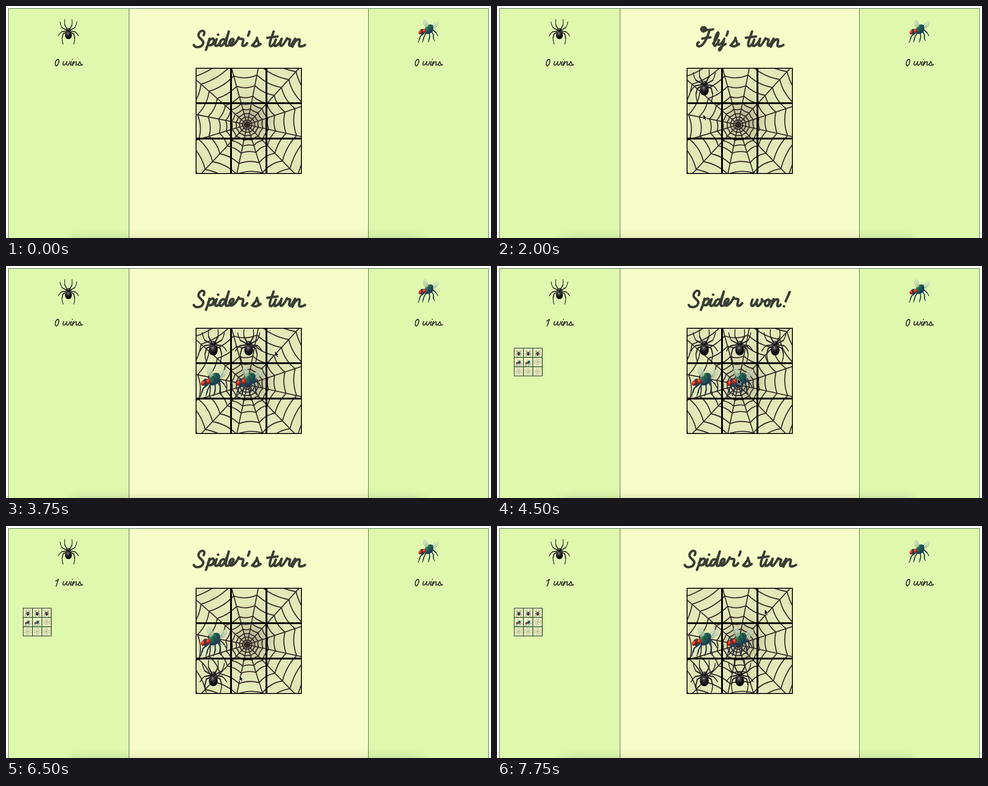
These frames come from a looping animation (1082x518 px, 8 s). An HTML page:

```html
<!DOCTYPE html>
<html lang="en">
<head>
<meta charset="utf-8">
<title>Spider and fly</title>
<style>
html, body { margin: 0; width: 100%; height: 100%; overflow: hidden; background: #fff; }
#stage { display: block; position: absolute; left: 0; top: 0; width: 1082px; height: 518px; overflow: hidden; }
.frame { stroke: #2a5a30; stroke-width: 1; }
.ink { fill: none; stroke: #3a3f35; stroke-linecap: round; stroke-linejoin: round; filter: drop-shadow(.8px .9px 0 #23281f); }
.big { stroke-width: 5; }
.small { stroke-width: 1.9; }
.label { fill: transparent; text-anchor: middle; font-family: "Noto Serif", serif; font-style: italic; }
.web { fill: none; stroke: #362c2a; stroke-linecap: round; }
.cell { fill: none; stroke: #000; stroke-width: 2; }
.mini-cell { fill: #f3f7c6; stroke: #2a5a30; stroke-width: .9; }
</style>
</head>
<body>
<svg id="stage" width="1082" height="518" viewBox="0 0 1082 518">
  <defs>
    <radialGradient id="shade" gradientUnits="userSpaceOnUse" cx="550" cy="256" r="150">
      <stop offset="0" stop-color="#adab8a"/>
      <stop offset=".14" stop-color="#bfbf98"/>
      <stop offset=".32" stop-color="#dbe0b0"/>
      <stop offset=".7" stop-color="#e5ebba"/>
      <stop offset="1" stop-color="#dfe5b3"/>
    </radialGradient>
    <filter id="blur" x="-10%" y="-200%" width="120%" height="500%">
      <feGaussianBlur stdDeviation="15"/>
    </filter>
    <radialGradient id="shell" cx=".42" cy=".27" r=".7">
      <stop offset="0" stop-color="#9a99a0"/>
      <stop offset=".22" stop-color="#434247"/>
      <stop offset=".55" stop-color="#18171b"/>
      <stop offset="1" stop-color="#060608"/>
    </radialGradient>
    <linearGradient id="green" x1="0" y1="0" x2=".5" y2="1">
      <stop offset="0" stop-color="#6fa873"/>
      <stop offset=".4" stop-color="#2a6e52"/>
      <stop offset="1" stop-color="#1b4356"/>
    </linearGradient>
    <radialGradient id="eye" cx=".4" cy=".35" r=".65">
      <stop offset="0" stop-color="#ff7a52"/>
      <stop offset=".45" stop-color="#dd2b1b"/>
      <stop offset="1" stop-color="#7c1210"/>
    </radialGradient>
    <linearGradient id="wing" x1="0" y1="0" x2="0" y2="1">
      <stop offset="0" stop-color="#e4f0d4" stop-opacity=".75"/>
      <stop offset="1" stop-color="#a3bf9c" stop-opacity=".75"/>
    </linearGradient>

    <g id="legs" fill="none" stroke="#19181c" stroke-linecap="round" stroke-linejoin="round">
      <path stroke-width="2.8" d="M36 33L29 20M34 35L21 28M33 38L20 40M34 41L24 46L21 58"/>
      <path stroke-width="1.8" d="M29 20Q28 12 29 4M21 28Q16 20 15 11M20 40Q13 45 10 52M21 58Q21 68 24 76"/>
      <path stroke="#77767c" stroke-width=".6" d="M33 28L29 20M31 33L22 28M30 38L21 40M23 47L21 57"/>
    </g>
    <g id="spider">
      <use href="#legs"/>
      <use href="#legs" transform="matrix(-1 0 0 1 79 0)"/>
      <ellipse cx="39.5" cy="35" rx="6" ry="6" fill="url(#shell)"/>
      <ellipse cx="39.5" cy="50" rx="10" ry="11.5" fill="url(#shell)"/>
    </g>

    <g id="fly">
      <g fill="none" stroke="#1b3148" stroke-linecap="round" stroke-linejoin="round">
        <path stroke-width="3" d="M28 47L17 56L14 65M34 46L27 59L25 67M43 43L44 58L42 67M50 43L55 52L55 63M54 38L63 46"/>
        <path stroke-width="2" d="M14 65L11 74M25 67L23 73M42 67L40 73M55 63L58 69M63 46L68 55"/>
        <path stroke="#5580a0" stroke-width=".8" d="M26 48L17 56M31 49L26 60M44 47V57M52 45L55 52"/>
      </g>
      <path d="M47 29C55 18 65 12 70 15C70 25 63 33 51 35Z" fill="url(#wing)" stroke="#8eab90" stroke-width=".7"/>
      <path d="M51 32Q61 25 68 18M53 34Q62 30 68 23" fill="none" stroke="#8eab90" stroke-width=".6"/>
      <ellipse cx="43" cy="41" rx="13" ry="7" transform="rotate(-28 43 41)" fill="#1c3c56"/>
      <ellipse cx="42" cy="33" rx="14" ry="10" transform="rotate(-38 42 33)" fill="url(#green)"/>
      <path d="M36 28Q43 33 44 42M44 23Q50 29 51 37" fill="none" stroke="#143a3e" stroke-width="1.3"/>
      <path d="M33 31C22 21 25 9 31 7C38 13 40 22 39 28Z" fill="url(#wing)" stroke="#8eab90" stroke-width=".7"/>
      <path d="M34 29Q29 18 30 10M36 28Q35 18 32 11" fill="none" stroke="#8eab90" stroke-width=".6"/>
      <ellipse cx="23" cy="43" rx="8" ry="8.5" fill="#1d4655"/>
      <path d="M21 47L19 54L25 52Z" fill="#24384a"/>
      <ellipse cx="16.5" cy="44.500" rx="4.400" ry="6" transform="rotate(12 16 44)" fill="url(#eye)"/>
      <ellipse cx="28" cy="40.500" rx="5" ry="6" transform="rotate(12 28 40)" fill="url(#eye)"/>
    </g>

    <path id="Spider" d="M441 65C446 56 437 51 431 60C424 72 442 74 440 83C437 94 421 94 419 87
      M454 73C452 84 448 92 446 98M451 82C455 72 465 70 464 77C463 86 455 89 452 87C460 90 466 82 470 74C466 84 465 90 470 89C474 88 476 84 478 81M473 64h.5
      M489 76C482 70 474 82 477 88C482 92 490 82 497 57C490 82 488 90 493 89C500 88 510 78 507 74C503 70 496 82 499 87C503 92 513 84 519 70
      M519 70C518 75 526 72 529 74C531 78 524 88 529 89C533 89 536 86 538 83"/>
    <path id="turn" d="M543 57C543 61 541 64 540 66
      M549 88C555 82 560 76 560 71C560 78 566 82 563 87C559 92 552 90 550 87M563 88L568 85
      M597 57C593 70 586 84 589 89C592 92 598 86 602 75M583 71C590 70 598 69 606 68
      M602 75C598 84 597 91 602 89C609 86 613 78 615 73C612 82 610 90 615 89C620 86 624 78 627 72C626 76 634 72 634 76C632 82 630 89 634 89C638 87 640 80 644 75
      M645 73C643 80 640 87 639 91C643 80 651 72 655 75C657 79 651 88 655 90C660 91 664 89 667 87"/>
    <path id="Fly" d="M460 57C452 52 457 46 464 48C470 52 465 58 459 55C460 50 470 56 482 52
      M474 55C470 68 462 88 452 90C445 91 445 83 450 81M458 73C464 71 470 71 476 70
      M482 84C488 78 497 61 493 59C489 60 481 88 486 89C490 88 493 82 495 76C492 82 492 88 497 86C503 82 506 76 507 73C505 82 501 96 497 99C492 99 498 91 510 85"/>
    <path id="won" d="M570 75C566 84 566 91 571 89C576 86 579 80 581 75C578 84 579 91 583 89C589 86 592 78 591 74C592 79 596 79 599 78
      M606 75C599 74 595 86 600 89C606 91 611 80 606 75C606 79 612 79 616 77
      M617 74C615 81 613 87 611 91C615 80 622 72 627 75C629 79 622 88 627 90C630 90 632 88 633 86
      M653 58C650 66 646 73 644 79M640 90h.5"/>
    <path id="wins" d="M129 124C126 129 127 133 130 132C133 130 135 127 136 124C134 129 135 133 138 132C141 130 142 126 142 124
      M146 124C144 128 143 132 145 132C147 132 149 128 150 125M148 119h.3M151 124L148 133C151 126 156 123 157 125C157 128 155 132 157 132C160 132 163 128 165 124C165 128 169 129 167 132C165 133 162 133 161 131M168 132L171 131"/>
    <path id="zero" d="M116 119C110 120 108 132 112 134C117 133 120 120 116 119"/>
    <path id="one" d="M111 123L117 119C115 124 114 129 112 134"/>
  </defs>

  <g class="frame">
    <path d="M5.500 530V5.500H274.500V530Z" fill="#dff8ae"/>
    <path d="M274.500 530V5.500H808.500V530Z" fill="#f6fdc9"/>
    <path d="M808.500 530V5.500H1076.500V530Z" fill="#dff8ae"/>
  </g>
  <rect x="146" y="524" width="782" height="50" opacity=".22" filter="url(#blur)"/>
  <use href="#spider" transform="translate(109 27) scale(.765)"/>
  <use href="#fly" transform="translate(911.500 24.600) scale(.765)"/>

  <g class="ink small">
    <use id="score0" href="#zero"/>
    <use id="score1" href="#one"/>
    <use href="#wins"/>
    <use href="#zero" x="803"/>
    <use href="#wins" x="803"/>
  </g>
  <text id="score" class="label" x="140" y="132" font-size="18"></text>
  <text class="label" x="943" y="132" font-size="18">0 wins</text>

  <g class="ink big">
    <g id="spiderTurn"><use href="#Spider"/><use href="#turn"/></g>
    <g id="flyTurn"><use href="#Fly"/><use href="#turn" x="-28"/></g>
    <g id="spiderWon"><use href="#Spider" x="9"/><use href="#won"/></g>
  </g>
  <text id="title" class="label" x="542" y="91" font-size="40"></text>

  <svg x="423" y="138" width="237" height="237" viewBox="423 138 237 237">
    <rect x="423" y="138" width="237" height="237" fill="url(#shade)"/>
    <path id="web" class="web" stroke-width="2.300"/>
    <circle cx="538" cy="265" r="7" fill="#362c2a"/>
  </svg>
  <g id="pieces"></g>
  <g id="grid"></g>
  <g id="mini"></g>
  <path id="cursor" d="M0 0V12L2.800 9.500L4.800 14L6.800 13.100L4.900 8.800H8.500Z" fill="#000" stroke="#fff" stroke-width=".8"/>
</svg>

<script>
const STEP = 250, STEPS = 32, RESET = 19, WIN = 16;
const $ = id => document.getElementById(id);

function add(parent, tag, attrs) {
  const el = document.createElementNS('http://www.w3.org/2000/svg', tag);
  for (const k in attrs) el.setAttribute(k, attrs[k]);
  return parent.appendChild(el);
}

// Spokes of [angle, length] joined by rings that sag towards the middle.
function webPath(cx, cy, spokes, rings, sag) {
  const at = (a, r) => `${(cx + r * Math.cos(a)).toFixed(1)} ${(cy + r * Math.sin(a)).toFixed(1)}`;
  let d = '';
  spokes.forEach(([a, len], i) => {
    let b = spokes[(i + 1) % spokes.length][0];
    if (b < a) b += 2 * Math.PI;
    d += `M${cx} ${cy}L${at(a, len)}`;
    for (const r of rings) d += `M${at(a, r)}Q${at((a + b) / 2, r * sag)} ${at(b, r)}`;
  });
  return d;
}

const ends = [[563, 138], [655, 138], [660, 224], [660, 292], [645, 375], [573, 375],
  [515, 375], [435, 375], [423, 300], [423, 242], [423, 164], [503, 138]];
const spokes = ends
  .map(([x, y]) => [Math.atan2(y - 265, x - 538), Math.hypot(x - 538, y - 265)])
  .sort((a, b) => a[0] - b[0]);
$('web').setAttribute('d', webPath(538, 265, spokes, [11, 18, 26, 36, 49, 65, 89, 113, 137, 161], .88));

const cellX = c => c % 3, cellY = c => Math.floor(c / 3);
for (let c = 0; c < 9; c++)
  add($('grid'), 'rect', { class: 'cell', x: 424 + 79 * cellX(c), y: 139 + 79 * cellY(c), width: 77, height: 77 });

// [first step, end step, cell, piece]
const moves = [
  [6, RESET, 0, 'spider'], [9, RESET, 3, 'fly'], [11, RESET, 1, 'spider'],
  [13, RESET, 4, 'fly'], [WIN, RESET, 2, 'spider'],
  [23, STEPS, 6, 'spider'], [25, STEPS, 3, 'fly'], [27, STEPS, 7, 'spider'], [29, STEPS, 4, 'fly']
];
const pieces = moves.map(([, , c, kind]) =>
  add($('pieces'), 'use', { href: '#' + kind, x: 423 + 79 * cellX(c), y: 138 + 79 * cellY(c) }));

// Small picture of the finished game.
const star = Array.from({ length: 8 }, (_, i) => [(i + .5) * Math.PI / 4, 8.5]);
for (let c = 0; c < 9; c++) {
  const x = 38 + 21 * cellX(c), y = 183 + 21 * cellY(c);
  add($('mini'), 'rect', { class: 'mini-cell', x: x + .5, y: y + .5, width: 20, height: 20 });
  const move = moves.slice(0, 5).find(m => m[2] === c);
  if (move) add($('mini'), 'use', { href: '#' + move[3], transform: `translate(${x + 1} ${y + 2}) scale(.245)` });
  else add($('mini'), 'path', { class: 'web', d: webPath(x + 10.5, y + 10.5, star, [3, 5.5, 8], .85), 'stroke-width': .5, opacity: .4 });
}
add($('mini'), 'rect', { x: 38.5, y: 183.5, width: 62.5, height: 62, fill: 'none', stroke: '#1f3d22', 'stroke-width': 1.4 });

// Pointer stops: [step, x, y]
const stops = [[1, 453, 130], [2, 450, 152], [3, 445, 178], [4, 446, 205], [5, 452, 212],
  [6, 452, 205], [7, 456, 225], [8, 460, 242], [9, 461, 248], [10, 500, 215], [11, 530, 190],
  [12, 532, 250], [13, 535, 256], [14, 565, 220], [15, 600, 190], [18, 537, 252], [21, 490, 300],
  [22, 458, 332], [23, 458, 336], [24, 456, 290], [25, 457, 260], [26, 521, 334], [27, 533, 336],
  [28, 537, 300], [29, 538, 268], [30, 540, 276], [31, 597, 186]];

const titles = { spiderTurn: "Spider's turn", flyTurn: "Fly's turn", spiderWon: 'Spider won!' };
const show = (el, on) => { el.style.display = on ? '' : 'none'; };

function render(step) {
  const live = moves.map(([from, to]) => step >= from && step < to);
  pieces.forEach((p, i) => show(p, live[i]));

  const count = live.filter(Boolean).length;
  const state = step >= WIN && step < RESET ? 'spiderWon' : count % 2 ? 'flyTurn' : 'spiderTurn';
  for (const id in titles) show($(id), id === state);
  $('title').textContent = titles[state];

  const won = step >= WIN;
  show($('score0'), !won);
  show($('score1'), won);
  show($('mini'), won);
  $('score').textContent = (won ? 1 : 0) + ' wins';

  const stop = stops.filter(s => s[0] <= step).pop();
  show($('cursor'), stop);
  if (stop) $('cursor').setAttribute('transform', `translate(${stop[1]} ${stop[2]})`);
}

let last = -1;
const start = performance.now();
function tick() {
  const step = Math.floor((performance.now() - start) / STEP) % STEPS;
  if (step !== last) render(last = step);
  requestAnimationFrame(tick);
}
tick();
</script>
</body>
</html>
```
